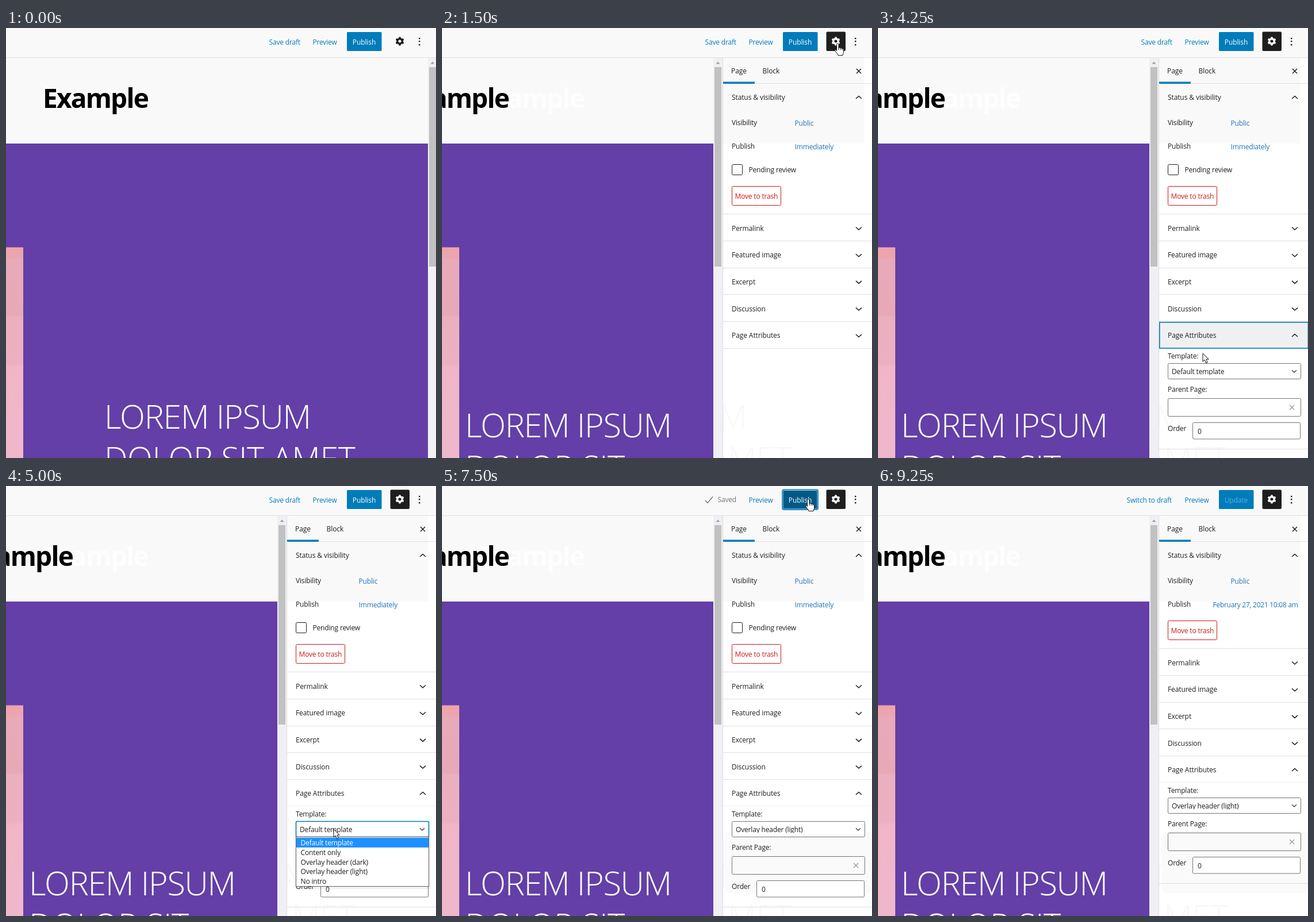
An HTML page for the animation above (9500 ms loop, 748 px wide and 748 px high).

```html
<!DOCTYPE html>
<html lang="en">
<head>
<meta charset="utf-8">
<title>Page template</title>
<style>
html, body { margin: 0; width: 100%; height: 100%; overflow: hidden; background: #f9f9f9; }
svg { display: block; width: 748px; height: 748px; }
text { font: 400 12px "Open Sans", "Noto Sans", sans-serif; letter-spacing: -.17px; fill: #1e1e1e; }
.m { font-weight: 500; letter-spacing: -.09px; }
.link { fill: #007cba; }
.side { fill: #1f74b8; }
.date { letter-spacing: -.27px; }
.trash { fill: #cc1818; }
.muted { fill: #757575; }
.white { fill: #fff; }
.pale { fill: #5eb0dc; }
.mid { text-anchor: middle; }
.title { font-size: 46px; font-weight: 700; letter-spacing: -1.8px; fill: #000; }
.hero { font-size: 57.4px; font-weight: 300; letter-spacing: -.4px; fill: #fff; }
.tight { letter-spacing: -1.25px; }
.title.ghost { fill: #fefefe; }
.hero.ghost { fill: #f8f8f8; }
.line { stroke: #e0e0e0; }
.box { fill: #fff; stroke: #757575; }
.focus { fill: none; stroke: #007cba; stroke-width: 1.6; }
.icon { fill: none; stroke: #1e1e1e; stroke-width: 1.5; }
.cursor { fill: #fff; stroke: #111; stroke-width: 1; stroke-linejoin: round; }
</style>
</head>
<body>
<svg id="stage" viewBox="0 0 748 748">
  <defs>
    <linearGradient id="pink" x1="0" y1="0" x2="0" y2="1">
      <stop offset="0" stop-color="#eda3ac"/><stop offset=".05" stop-color="#eca5af"/>
      <stop offset=".055" stop-color="#e8a9b8"/><stop offset=".32" stop-color="#e8a9b7"/>
      <stop offset=".33" stop-color="#eab0be"/><stop offset=".55" stop-color="#ebb1c0"/>
      <stop offset=".57" stop-color="#f0b6c7"/><stop offset="1" stop-color="#efb7ca"/>
    </linearGradient>
    <clipPath id="select"><path d="M505 584h212v19.500H505z"/></clipPath>
    <clipPath id="panel"><path d="M489 600h259v148H489z"/></clipPath>
    <g id="gear" fill="none">
      <circle r="4.300" stroke-width="3.400"/>
      <circle r="6.300" stroke-width="2.400" pathLength="12" stroke-dasharray="1 1" transform="rotate(15)"/>
    </g>
    <path id="down" class="icon" d="M-5 -2L0 2.500L5 -2"/>
    <path id="up" class="icon" d="M-5 2L0 -2.500L5 2"/>
    <path id="cross" d="M-4 -4L4 4M4 -4L-4 4"/>
  </defs>
</svg>
<script>
const LOOP = 9500, OPEN = 1500, ATTR = 3750, LIST = 4750, PICK = 6250, SAVED = 7000, DONE = 8000, DATED = 8250;
const stage = document.getElementById('stage');

const text = (x, y, s, cls = '', attrs = '') => `<text x="${x}" y="${y}" class="${cls}" ${attrs}>${s}</text>`;
const rect = (x, y, w, h, attrs = '') => `<rect x="${x}" y="${y}" width="${w}" height="${h}" ${attrs}/>`;
const use = (id, x, y, attrs = '') => `<use href="#${id}" x="${x}" y="${y}" ${attrs}/>`;
const rule = (y, x = 489) => `<path class="line" d="M${x} ${y}H748"/>`;
const during = (from, to, ...parts) => `<g data-from="${from}" data-to="${to}">${parts.join('')}</g>`;

const title = (x, cls = '') => text(x, 139, 'Example', 'title ' + cls);
const hero = (x, y, second, cls = '') =>
  text(x, y, 'LOREM IPSUM', 'hero tight ' + cls) + text(x, y + 73, second, 'hero ' + cls);
const scrollbar = (x, w, track) =>
  rect(x, 52, w, 696, `fill="${track}"`) +
  rect(x + 2, 68, 12, 347, 'fill="#c1c1c1"') +
  `<path d="M${x + 4.5} 62.500l3.500 -4l3.500 4z" fill="#a0a0a0"/>`;

const page =
  rect(0, 0, 748, 748, 'fill="#f9f9f9"') +
  during(0, OPEN,
    title(64),
    rect(0, 201, 734, 547, 'fill="#633fa7"'),
    hero(171, 697, 'DOLOR SIT AMET'),
    scrollbar(734, 14, '#f1f1f1')) +
  during(OPEN, LOOP,
    title(64, 'ghost'), title(-67),
    rect(0, 201, 472, 547, 'fill="#633fa7"'),
    hero(40, 712, 'DOLOR SIT'),
    scrollbar(472, 16, '#f0eff5')) +
  rect(0, 381.5, 30, 367, 'fill="url(#pink)"');

const settings = (rowY, name, icon = 'down') =>
  text(504, rowY + 4, name, 'm') + use(icon, 725, rowY);

const attributes =
  text(504, 575, 'Template:') +
  rect(504.5, 583.5, 231, 27, 'class="box" rx="2"') +
  during(LIST, PICK, rect(504.5, 583.5, 231, 27, 'class="focus" rx="2"')) +
  `<g clip-path="url(#select)">` +
    during(0, PICK, text(511, 602, 'Default template')) +
    during(PICK, LOOP, text(511, 602, 'Overlay header (light)')) +
  `</g>` +
  use('down', 0, 0, 'transform="translate(724 597) scale(.8)"') +
  text(504, 633, 'Parent Page:') +
  during(0, PICK, rect(504.5, 644.5, 231, 31, 'class="box" rx="2"')) +
  during(PICK, LOOP, rect(504.5, 644.5, 231, 31, 'fill="#fafafa" stroke="#757575" rx="2"')) +
  use('cross', 720, 660, 'stroke="#999" stroke-width="1.300"') +
  text(504, 701, 'Order') +
  rect(547.5, 686.5, 187, 28.5, 'class="box" rx="2"') +
  text(556, 706, '0') + rule(732.5);

const options = ['Default template', 'Content only', 'Overlay header (dark)', 'Overlay header (light)', 'No intro'];
const optionY = i => 612 + i * 16.8;
const list = during(LIST, PICK,
  rect(502, 609, 237, 92, 'fill="#000" opacity=".06" rx="3"'),
  rect(504.5, 610.5, 231, 86, 'fill="#fff" stroke="#666"'),
  rect(505, 0, 230, 16.8, 'id="mark" fill="#1e90ff"'),
  ...options.map((s, i) => text(512.5, optionY(i) + 13, s, '', `data-option="${i}"`)));

const sidebar = during(OPEN, LOOP,
  rect(489, 52, 259, 696, 'fill="#fff"'),
  rect(489, 52, 245, 149, 'fill="#f9f9f9"'),
  `<g clip-path="url(#panel)">${hero(171, 697, 'DOLOR SIT AMET', 'ghost')}</g>`,
  during(PICK, LOOP, rect(493, 601, 255, 107, 'fill="#fafafa" rx="8"')),
  '<path d="M488.500 52V748" stroke="#ddd"/>',
  text(503, 79, 'Page', 'm'), text(557.5, 79, 'Block', 'm'),
  use('cross', 725, 75, 'stroke="#1e1e1e" stroke-width="1.500"'),
  rule(96.5), rect(489, 93.5, 55, 3.5, 'fill="#007cba"'),
  during(2500, ATTR, rect(489.8, 53, 53.5, 43, 'class="focus"')),
  settings(121, 'Status &amp; visibility', 'up'),
  text(504, 169, 'Visibility'), text(613.5, 170, 'Public', 'side'),
  text(504, 210, 'Publish'),
  during(0, DATED,
    text(613.5, 211, 'Immediately', 'side'),
    rect(504.5, 237.5, 18, 18, 'fill="#fff" stroke="#1e1e1e" rx="2"'),
    text(533.5, 251, 'Pending review')),
  during(DATED, LOOP, text(582.5, 211, 'February 27, 2021 10:08 am', 'side date')),
  `<g id="lower">`,
  rect(504.5, 275.5, 85, 33, 'fill="#fff" stroke="#cc1818" rx="2"'),
  text(509.5, 297, 'Move to trash', 'trash'),
  rule(323.5),
  ...['Permalink', 'Featured image', 'Excerpt', 'Discussion'].map((s, i) =>
    settings(348.5 + i * 46.7, s) + rule(Math.round(323 + (i + 1) * 46.8) + .5)),
  during(0, ATTR, settings(535, 'Page Attributes'), rule(557.5)),
  during(ATTR, LOOP,
    during(ATTR, LIST, rect(489.8, 512, 258.5, 45, 'fill="#f0f0f0" stroke="#007cba" stroke-width="1.600"')),
    during(LIST, LOOP, '<path d="M489 556.500H748" stroke="#f2f2f2"/>'),
    settings(535, 'Page Attributes', 'up'), attributes),
  `</g>`, list);

const button = (fill, label, ink) =>
  rect(593, 7, 60.5, 33, `fill="${fill}" rx="1.500"`) + text(623, 29, label, 'm mid ' + ink);

const topbar =
  rect(0, 0, 748, 52, 'fill="#f9f9f9"') + rule(51.5, 0) +
  during(0, SAVED, text(457.5, 29, 'Save draft', 'link')) +
  during(SAVED, DONE,
    '<path d="M458 25l4 4.500l9 -11" fill="none" stroke="#757575" stroke-width="1.400"/>',
    text(479.5, 28, 'Saved', 'muted')) +
  during(DONE, LOOP, text(432.5, 29, 'Switch to draft', 'link')) +
  text(533.5, 29, 'Preview', 'link') +
  during(0, 7250, button('#007cba', 'Publish', 'white')) +
  during(7250, DONE, button('#005a87', 'Publish', 'white')) +
  during(DONE, LOOP, button('#007cba', 'Update', 'pale')) +
  during(7500, 8750,
    rect(593, 7.5, 60, 32.5, 'fill="none" stroke="#fff" stroke-width=".800" rx="1.500"'),
    rect(592, 6.3, 62, 34.8, 'class="focus" rx="2.500"')) +
  during(0, OPEN, use('gear', 685, 23, 'stroke="#1e1e1e"')) +
  during(1250, OPEN, rect(667.5, 5.8, 35.4, 35.4, 'class="focus" rx="2"')) +
  during(OPEN, LOOP, rect(668.5, 6.5, 33.5, 33.5, 'fill="#1e1e1e" rx="2"'), use('gear', 685, 23, 'stroke="#fff"')) +
  [17, 22, 28].map(y => rect(718, y, 2.4, 2.4, 'fill="#1e1e1e"')).join('');

const pointer = `<g id="cursor">
  <path class="cursor" data-kind="hand" d="M3.500 14V2.600C3.500 .2 7 .2 7 2.600V9C7.500 7.600 10 7.700 10.200 9.400C10.900 8.300 13 8.700 13.100 10.300C13.900 9.600 15.600 10 15.600 11.800V15.500C15.600 18 14 19 14 21.700H6C6 19 2.300 16.800 .8 13.500C.2 11.600 2 11 3.500 13z M7 9v3M10.200 9.500v2.500M13.100 10.500v2"/>
  <path class="cursor" data-kind="arrow" d="M0 0V14.200L3.300 11.200L5.600 16.800L8.200 15.700L5.900 10.200H10.200z"/>
</g>`;

stage.insertAdjacentHTML('beforeend', page + topbar + sidebar + pointer);

// Pointer stops: time, x, y, shape
const stops = [
  [0, 0, 0, ''],
  [250, 702, 134, 'arrow'], [500, 699, 100, 'arrow'], [750, 692, 62, 'arrow'], [1000, 683, 26, 'hand'],
  [1750, 645, 48, 'arrow'], [2000, 590, 70, 'arrow'], [2250, 518, 81, 'hand'],
  [2750, 535, 200, 'arrow'], [3000, 573, 372, 'hand'], [3250, 568, 460, 'hand'], [3500, 560, 530, 'hand'],
  [4000, 562, 542, 'hand'], [4250, 565, 566, 'arrow'], [4500, 568, 590, 'arrow'], [5000, 570, 597, 'arrow'],
  [5250, 570, 618, 'arrow'], [5500, 570, 648, 'arrow'], [5750, 570, 669, 'arrow'],
  [6500, 640, 560, 'arrow'], [6750, 696, 368, 'hand'], [7000, 690, 180, 'arrow'], [7250, 632, 22, 'hand'],
  [8750, 650, 29, 'hand'], [9000, 670, 36, 'hand'], [9250, 0, 0, '']
];
// Highlighted option: time, index
const marks = [[0, 0], [5500, 2], [5750, 3]];

const at = (table, t) => table.findLast(row => row[0] <= t);
const show = (el, on) => { el.style.display = on ? '' : 'none'; };
const $ = id => document.getElementById(id);
const timed = [...stage.querySelectorAll('[data-from]')];
const shapes = [...stage.querySelectorAll('[data-kind]')];
const labels = [...stage.querySelectorAll('[data-option]')];

function draw(t) {
  for (const el of timed) show(el, t >= +el.dataset.from && t < +el.dataset.to);
  const [, x, y, kind] = at(stops, t);
  $('cursor').setAttribute('transform', `translate(${x} ${y})`);
  for (const el of shapes) show(el, el.dataset.kind === kind);
  const picked = at(marks, t)[1];
  $('mark').setAttribute('y', optionY(picked));
  for (const el of labels) el.style.fill = +el.dataset.option === picked ? '#fff' : '';
  $('lower').setAttribute('transform', `translate(0 ${t < DATED ? 0 : -41})`);
}

function tick() {
  draw(performance.now() % LOOP);
  requestAnimationFrame(tick);
}
tick();
</script>
</body>
</html>
```
